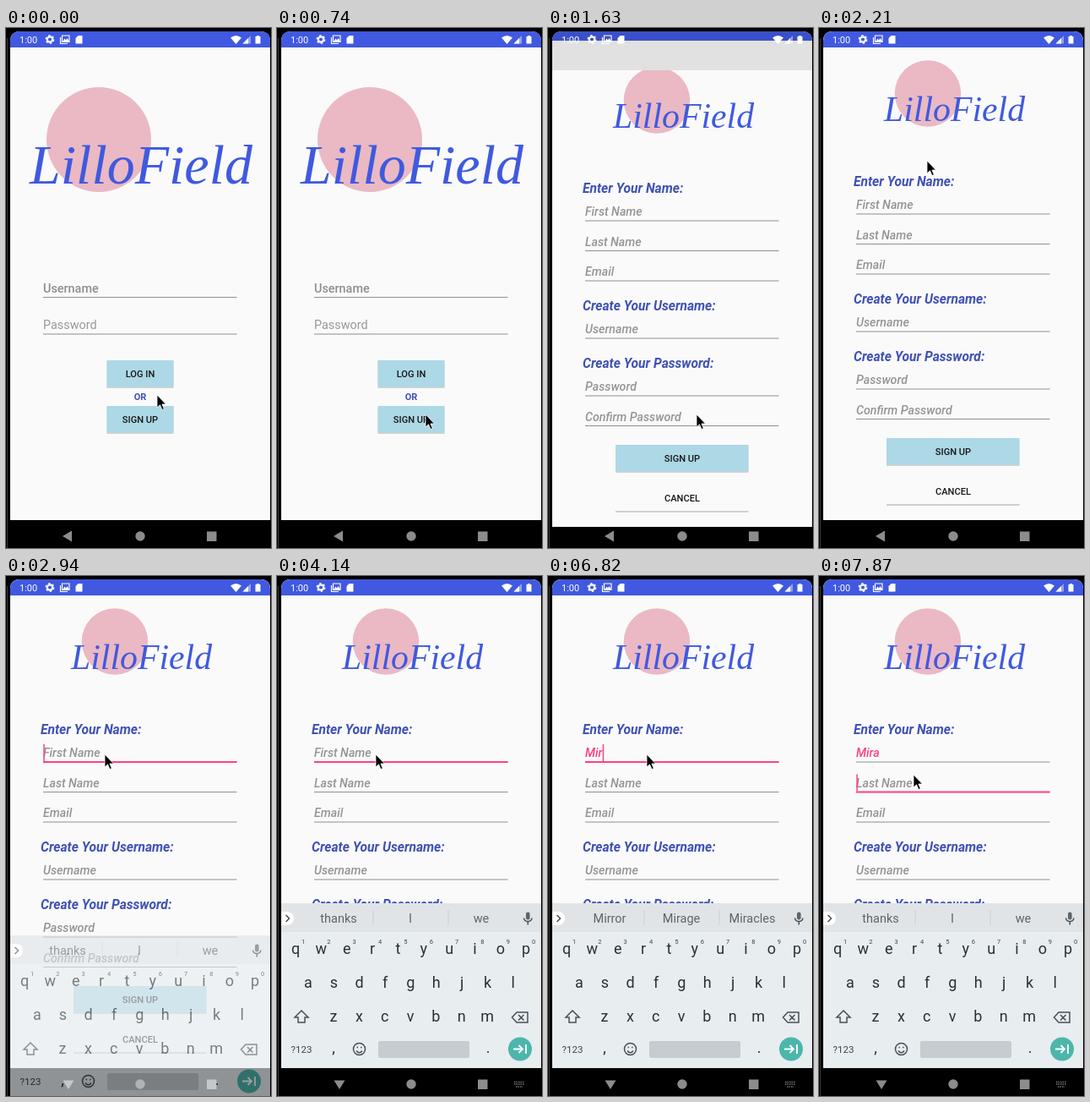
Write an HTML page that moves like this. It is 314 by 615 pixels and loops after 8 s.

```html
<!DOCTYPE html>
<html lang="en">
<head>
<meta charset="utf-8">
<title>Sign up</title>
<style>
html, body { margin: 0; width: 100%; height: 100%; overflow: hidden; background: #000 }
svg { display: block; width: 314px; height: 615px; font-family: Roboto, sans-serif }
.mid { text-anchor: middle }
.hint { font-size: 14.2px; font-weight: 500; font-style: italic; fill: #949494 }
.head { font-size: 15.6px; font-weight: 700; font-style: italic; fill: #3f51b5 }
.btn { font-size: 11.1px; font-weight: 500; fill: #161616 }
.key { font-size: 18px; fill: #263238 }
.sup { font-size: 7.5px; fill: #37474f }
.word { font-size: 14.5px; fill: #5b666c }
.icon { fill: none; stroke: #455057; stroke-width: 1.5 }
.name { font: italic 66px "Liberation Serif", serif; fill: #4059e0 }
</style>
</head>
<body>
<svg viewBox="0 0 314 615">
  <defs>
    <clipPath id="screen"><path d="M5 615V16Q5 4 17 4H301Q313 4 313 16V615Z"/></clipPath>
    <clipPath id="reveal"><rect id="window" x="0" width="314" height="615"/></clipPath>
    <g id="logo">
      <circle cx="110" cy="132" r="62" fill="#eab9c4"/>
      <text class="name mid" x="160" y="184">LilloField</text>
    </g>
  </defs>
  <path d="M1.5 12V615" stroke="#3a3a3a"/>
  <g id="nav" fill="#8c8c8c">
    <path id="back" d="M67 601L78 594.500V607.500Z"/>
    <path id="down" d="M67.500 596.500H80.500L74 607Z"/>
    <circle cx="159" cy="601" r="5.700"/>
    <rect x="238" y="595.500" width="11.500" height="11.500"/>
    <g id="imeIcon" fill="none" stroke="#777" stroke-width="1.300" stroke-dasharray="1.500 1">
      <path d="M281 598.500H293M281 601H293M283 604H291"/>
    </g>
  </g>
  <g clip-path="url(#screen)">
    <g id="login"></g>
    <g clip-path="url(#reveal)"><g id="signup"></g></g>
    <g fill="#fff">
      <text x="16" y="17.800" font-size="11">1:00</text>
      <circle cx="52" cy="13.500" r="3.200" fill="none" stroke="#fff" stroke-width="2.200"/>
      <circle cx="52" cy="13.500" r="4.700" fill="none" stroke="#fff" stroke-width="1.400" stroke-dasharray="2.400 2.500"/>
      <path d="M64.500 11V18.500H73M66.500 9H75V16.500H66.500Z" fill="none" stroke="#fff" stroke-width="1.200"/>
      <path d="M67 16L69.500 12.500L71 14.500L72.500 12L75 16Z"/>
      <path d="M85.500 9H90.500V18.500H82.500V12Z"/>
      <path d="M266 11.500Q272.500 6.500 279 11.500L272.500 19Z"/>
      <path d="M290 9V18.500H280.500Z" opacity=".45"/><path d="M287 12V18.500H280.500Z"/>
      <path d="M295.500 10H297V9H300V10H301.500V18.500H295.500Z"/>
    </g>
    <g id="keyboard"></g>
  </g>
  <path id="pointer" d="M0 0V15L3.500 11.800L6 17.500L8.300 16.500L5.900 11H10.500Z" stroke="#fff" stroke-width=".8"/>
</svg>
<script>
const $ = id => document.getElementById(id);
const PINK = '#ff4081', LOOP = 8000;

const text = (x, y, s, cls, extra = '') => `<text x="${x}" y="${y}" class="${cls}" ${extra}>${s}</text>`;
const rect = (x, y, w, h, fill, extra = '') =>
  `<rect x="${x}" y="${y}" width="${w}" height="${h}" fill="${fill}" ${extra}/>`;
const button = (x, y, w, label, fill = '#add8e6') =>
  rect(x, y + 1, w, 32, '#d2d2d2') + rect(x, y, w, 31.5, fill) + text(159, y + 20, label, 'btn mid');
const underline = (y, id = '') => rect(44, y, 229.5, 1, '#8f8f8f', id && `id="${id}"`);
const page = body => rect(5, 4, 308, 578, '#fafafa') + rect(5, 4, 308, 19, '#4059e0') + body;

$('login').innerHTML = page(
  '<use href="#logo"/>' +
  text(44, 312.5, 'Username', '', 'font-size="14.4" font-weight="500" fill="#8e8e8e"') + underline(318) +
  text(44, 356, 'Password', '', 'font-size="14.4" fill="#999"') + underline(361.5) +
  button(119.5, 393, 79, 'LOG IN') +
  text(159, 440, 'OR', 'mid', 'font-size="11" font-weight="700" fill="#3f51b5"') +
  rect(119.5, 479, 79, 2.5, '#c4c4c4', 'id="press"') + button(119.5, 447, 79, 'SIGN UP') +
  rect(5, 4, 308, 578, '#000', 'id="dim"'));

const fields = [['First Name', 214], ['Last Name', 249.5], ['Email', 285],
  ['Username', 353], ['Password', 421], ['Confirm Password', 456.5]];
$('signup').innerHTML = page(
  '<use href="#logo" transform="translate(59.3 -6) scale(.633)"/>' +
  text(41, 187, 'Enter Your Name:', 'head') +
  text(41, 326, 'Create Your Username:', 'head') +
  text(41, 394, 'Create Your Password:', 'head') +
  fields.map(([label, y], i) => text(44, y, label, 'hint', `id="field${i}"`) + underline(y + 5.5)).join('') +
  button(80, 485, 157.5, 'SIGN UP') +
  rect(80, 563, 157.5, 2, '#d0d0d0') + text(159, 552, 'CANCEL', 'btn mid') +
  rect(44, 0, 229.5, 2, PINK, 'id="focus"') + rect(44.3, 0, 1.5, 20, PINK, 'id="caret"'));

const keyRow = (letters, x, y) =>
  [...letters].map((c, i) => text(x + i * 30.35, y, c, 'key mid')).join('');
$('keyboard').innerHTML =
  rect(5, 387, 308, 195, '#e8edf0') + rect(5, 387, 308, 34, '#e0e4e7') +
  '<path d="M5 397H12A8 8 0 0 1 12 413H5Z" fill="#fff"/>' +
  '<path class="icon" d="M10.500 401L14.500 405L10.500 409M114 395V413M203 395V413" stroke-width="1.800"/>' +
  '<path d="M114 394V414M203 394V414" stroke="#e0e4e7" stroke-width="2"/>' +
  '<path d="M114 395V413M203 395V413" stroke="#cbd0d3"/>' +
  [73, 158, 242].map((x, i) => text(x, 410, '', 'word mid', `id="word${i}"`)).join('') +
  rect(295, 397.5, 4.6, 9, '#5b666c', 'rx="2.3"') +
  '<path class="icon" d="M292.500 404.500A4.800 4.800 0 0 0 302 404.500M297.300 409V412.500" stroke-width="1.300"/>' +
  keyRow('qwertyuiop', 22, 447) + keyRow('asdfghjkl', 37, 487) + keyRow('zxcvbnm', 67, 527) +
  [...'1234567890'].map((d, i) => text(31 + i * 30.35, 435, d, 'sup mid')).join('') +
  '<path class="icon" d="M29 514L37 522H33V528H25V522H21Z"/>' +
  '<path class="icon" d="M284 516H297V528H284L278.500 522ZM286 519L292.500 525.500M292.500 519L286 525.500"/>' +
  text(29, 564, '?123', 'mid', 'font-size="11.5" fill="#37474f"') +
  text(67, 564, ',', 'key mid') + text(250, 564, '.', 'key mid') +
  '<circle class="icon" cx="97.500" cy="559.500" r="7"/>' +
  '<path class="icon" d="M94 561.500Q97.500 566 101 561.500M94.500 557.500H96M99 557.500H100.500"/>' +
  rect(120, 550, 108, 20, '#c7ccd0', 'rx="2"') +
  '<circle cx="288" cy="559.500" r="14" fill="#4db6ac"/>' +
  '<path d="M280 559.500H291M286.500 555L291 559.500L286.500 564M295 554V565" fill="none" stroke="#fff" stroke-width="1.800"/>';

// Latest entry [time, ...values] that has begun
const at = (t, steps) => steps.filter(s => s[0] <= t).pop().slice(1);

const pointer = [[0, 179, 434], [150, 178, 441], [300, 177, 451], [440, 176, 457],
  [1770, 170, 410], [1920, 153, 300], [2060, 138, 210], [2210, 128, 157], [2360, 122, 184],
  [2510, 117, 211], [7420, 116, 217], [7570, 113, 229], [7720, 112, 235]];
// Page offset, top of revealed area, shift and dimming of the page below
const opening = [[0, 22, 615, 0, 0], [1480, 22, 242, -2, .08], [1630, 8, 50, -8, .1],
  [1770, 2, 0, -12, .1], [1920, 0, 0, -12, .1]];
const keyboard = [[0, 60, 0], [2800, 46, .15], [2940, 38, .62], [3090, 8, .95], [3240, 0, 1]];
const blink = [[0, 0], [2650, 1], [3240, 0], [3690, 1], [4140, 0], [4740, 1], [5180, 0], [5780, 1], [6230, 0], [6520, 1]];
const typing = [[0, ''], [6520, 'M'], [6670, 'Mi'], [6820, 'Mir'], [7270, 'Mira']];

const set = (id, attrs) => { for (const k in attrs) $(id).setAttribute(k, attrs[k]); };
const show = (id, on) => set(id, { visibility: on ? 'visible' : 'hidden' });
const shift = (id, x, y) => set(id, { transform: `translate(${x} ${y})` });

function draw(t) {
  shift('pointer', ...at(t, pointer));
  show('press', t >= 440 && t < 740);

  const [rise, top, lift, dim] = at(t, opening);
  shift('login', 0, lift);
  shift('signup', 0, rise);
  set('window', { y: top });
  set('dim', { opacity: dim });

  const [drop, alpha] = at(t, keyboard);
  shift('keyboard', 0, drop);
  set('keyboard', { opacity: alpha });
  show('back', t < 2800);
  show('down', t >= 2800);
  show('imeIcon', t >= 3090);

  const [typed] = at(t, typing), second = t >= 7870, y = second ? 249.5 : 214;
  const first = $('field0');
  first.textContent = typed || 'First Name';
  first.style.fill = typed ? PINK : '';
  set('focus', { y: y + 5 });
  show('focus', t >= 2650 && t >= 1480);
  const end = typed && !second ? first.getComputedTextLength() : 0;
  set('caret', { x: 44.3 + end, y: y - 15 });
  show('caret', at(t, blink)[0]);

  const words = typed && !second ? ['Mirror', 'Mirage', 'Miracles'] : ['thanks', 'I', 'we'];
  words.forEach((w, i) => $('word' + i).textContent = w);
}

function tick() {
  draw(performance.now() % LOOP);
  requestAnimationFrame(tick);
}
tick();
</script>
</body>
</html>
```
